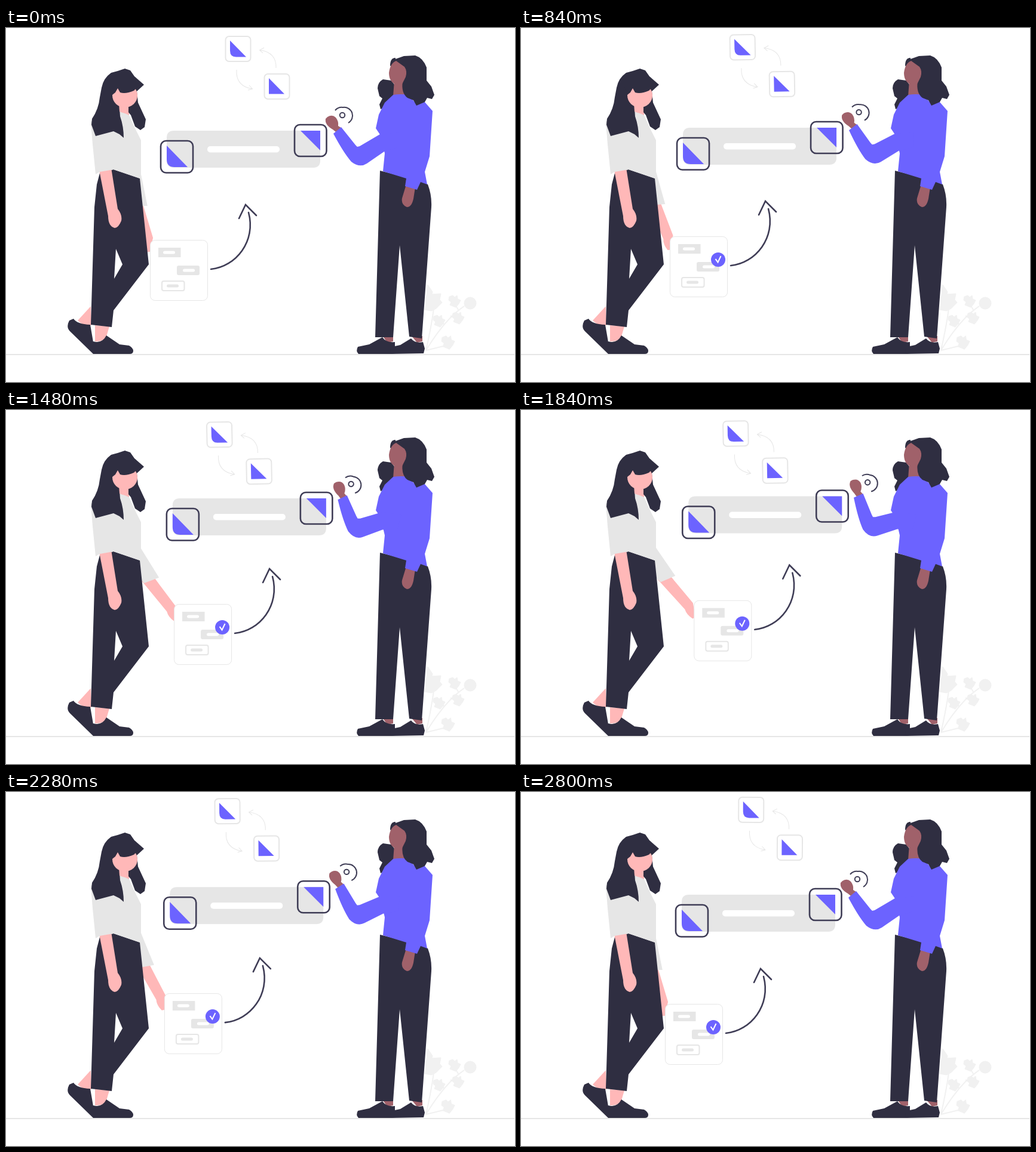
Recreate the animation shown at these times as an HTML page. Size 852x593 px, loop 2840 ms.

```html
<!DOCTYPE html>
<html lang="en">
<head>
<meta charset="utf-8">
<title>Design hand-over</title>
<style>
  html, body { margin: 0; width: 100%; height: 100%; overflow: hidden; background: #fff; }
  svg { display: block; width: 852px; height: 593px; }
  .dark { fill: #2f2e41; }
  .grey { fill: #e6e6e6; }
  .white { fill: #fff; }
  .violet { fill: #6c63ff; }
  .pale { fill: #ffb8b8; }
  .brown { fill: #a0616a; }
  .plant { fill: #f1f1f1; stroke: #f1f1f1; }
  .line { fill: none; stroke: #3f3d56; stroke-width: 2.6; }
  .thin { fill: none; stroke: #e6e6e6; }
</style>
</head>
<body>
<svg viewBox="0 0 852 593">
  <defs>
    <path id="leaf" d="M-9-8-3-10 0-7 4-10 5-4 10-2 7 4 2 10-3 8-8 6-6 1-10-2z"/>
  </defs>

  <g class="plant">
    <path d="M703 540Q735 487 767 466M703 540Q712 500 716 470M703 540L736 532M733 496L727 490M744 482L753 488M757 472L751 462" fill="none" stroke-width="2"/>
    <path d="M706 430L714 442 713 446 728 445 726 455 730 460 720 470 712 474 701 472z"/>
    <circle cx="777" cy="461" r="10"/>
    <use href="#leaf" x="751" y="458"/>
    <use href="#leaf" x="757" y="486"/>
    <use href="#leaf" x="725" y="491"/>
    <use href="#leaf" transform="translate(740 527) scale(1.1)"/>
  </g>
  <path d="M0 547H851" class="thin" stroke-width="2"/>

  <!-- woman on the left -->
  <g id="leftArm">
    <path class="pale" d="M226 286L248 281 283 328 286 352 281 354Q271 347 269 338L230 290z"/>
    <path class="grey" d="M192 200L226 232 256 281 231 290 196 255z"/>
  </g>
  <path class="pale" d="M142 466L143 498H130L120 490zM149 498L173 500 168 517Q163 526 149 525z"/>
  <g class="dark">
    <path d="M157 243L180 237 224 252 229 300 239 396 180 473 177 501 142 497 148 300 152 262zM184 370L181 420 195 396z" fill-rule="evenodd"/>
    <path d="M113 487Q119 496 141 497L146 526 155 545 146 546 107 508Q100 501 106 490z"/>
    <path d="M146 525Q161 529 168 515L190 530 206 532Q213 536 213 541 213 546 207 546H146z"/>
  </g>
  <path class="pale" d="M156 238L176 234 187 303Q195 313 193 323 188 335 182 335 171 332 171 315z"/>
  <path class="pale" d="M188 125H206V147H188z"/>
  <path class="grey" d="M150 150L142 157 145 195 150 245 157 241 180 237 224 252 226 251V188L216 168 206 146 190 139z"/>
  <g class="dark">
    <path d="M160 100Q163 84 176 75L187 72 199 68 208 71 215 81 231 95 219 106 221 125 234 153 232 166 225 171 216 165 209 146 204 140 190 134 191 148Q197 165 197 184L190 178 180 173 150 181 143 162 144 152Q155 136 157 116z"/>
  </g>
  <path class="pale" d="M189 126H205V143Q198 144 190 140z"/>
  <ellipse class="pale" cx="199" cy="113" rx="21" ry="20"/>
  <path class="dark" d="M172 96L190 82H216L225 99 219 100 214 105Q200 111 191 108L187 101 183 108 178 112z"/>

  <!-- woman on the right -->
  <path class="brown" d="M630 515H648V525L638 527zM679 516H697V525L688 527zM670 262L685 267 682 286Q679 300 671 300 661 296 663 285z"/>
  <g class="dark">
    <path d="M626 239L670 250 695 257 706 262Q713 280 712 300L696 520 675 517 659 364 648 518H618z"/>
    <path d="M630 518Q637 528 651 526V545L645 546H590Q585 541 589 534L608 530z"/>
    <path d="M678 520Q685 529 698 526L701 537 699 545 645 546Q641 541 646 534L660 531z"/>
    <path d="M645 88L631 86Q622 91 622 101L625 114 630 118 625 128 627 136 642 130 660 108z"/>
  </g>
  <path class="brown" d="M670 262L685 267 682 286Q679 300 671 300 661 296 663 285zM650 88H670V114H648z"/>
  <path class="violet" d="M648 112Q661 110 673 112L686 126 700 123 714 139 709 215 701 241 705 262 694 258 688 271 668 265 670 252 631 240 634 210 627 180 619 168 624 145 634 125z"/>
  <path class="dark" d="M643 63Q643 50 652 50V52L666 47 685 46Q698 50 704 66V88L712 98 717 112 713 119 705 117 701 124 687 130 682 121 672 117Q661 109 664 88z"/>
  <path class="brown" d="M653 55L667 65Q672 72 669 82L663 94Q661 97 656 96 641 92 641 75 643 59 653 55z"/>
  <g id="rightArm">
    <path class="brown" d="M538 149Q546 144 552 150 557 156 556 164L562 168 552 174 547 170Q533 162 535 152z"/>
    <path class="violet" d="M561 166L585 196 588 199 592 198 626 178 657 175V200L633 207 604 227Q592 235 578 224 565 209 548 177z"/>
    <g class="line" style="stroke-width:2">
      <circle cx="563" cy="146" r="4.2"/>
      <path d="M551 138Q556 132 564 133A14 14 0 0 1 573 159"/>
    </g>
  </g>

  <!-- wide bar with two handles -->
  <g id="bar">
    <path class="grey" d="M281 172H526V222Q526 234 514 234H281Q269 234 269 222V184Q269 172 281 172z"/>
    <rect class="white" x="337" y="198" width="121" height="10.5" rx="5"/>
    <path class="violet" d="M269 197L304 233H282Q269 233 269 220zM493 172H526V205z"/>
    <g class="line">
      <rect x="259" y="189" width="54" height="53.5" rx="9"/>
      <rect x="483" y="162" width="53.5" height="53" rx="9"/>
    </g>
  </g>

  <!-- card, curved arrow and tick -->
  <g id="card">
    <rect x="241.5" y="355.5" width="96" height="101" rx="8" fill="#fff" stroke="#e6e6e6"/>
    <g class="grey">
      <rect x="255" y="368" width="37.5" height="16"/>
      <rect x="286" y="398" width="38" height="16" rx="3"/>
      <rect x="269" y="429.500" width="20" height="5" rx="2.500"/>
    </g>
    <rect class="thin" stroke-width="2" x="261" y="424" width="37.500" height="16" rx="3"/>
    <rect class="white" x="263" y="373.500" width="20" height="5" rx="2.500"/>
    <rect class="white" x="296" y="403.500" width="20" height="5" rx="2.500"/>
    <path class="line" stroke-linecap="round" d="M343 404C385 400 419 357 406 309M390 319L401 296 419 314"/>
    <g id="badge">
      <circle class="violet" r="12"/>
      <path d="M-4.500-1L-.5 4.500 4.500-6" fill="none" stroke="#fff" stroke-width="2"/>
    </g>
  </g>

  <!-- pair of small icons -->
  <g id="icons">
    <g class="thin" stroke-width="2">
      <rect x="367.500" y="14" width="42" height="42" rx="6"/>
      <rect x="432.500" y="77" width="42" height="42" rx="6"/>
    </g>
    <path class="violet" d="M375 21L402 48.500H385Q375 48.500 375 38zM440 84L466 110.500H440z"/>
    <path class="thin" d="M386 70Q384 97 412 102M407 96L412.500 102 405 104M452 67Q453 41 425 37M432 33L424.500 37 430 42"/>
  </g>
</svg>

<script>
  const LOOP = 2840, SWAY = 3140;
  const place = (id, transform) => document.getElementById(id).setAttribute('transform', transform);

  // Steady rise from start, steady fall back to zero at end.
  const trip = (t, start, end, rise, fall) =>
    Math.max(0, Math.min((t - start) * rise, (end - t) * fall));

  function pop(t) {
    if (t < 320) return 1.25 * t / 320;
    return Math.max(1, 1.25 - 0.25 * (t - 320) / 220);
  }

  function draw(now) {
    const t = now % LOOP;
    const lift = trip(t, 672, 2665, 0.0297, 0.0333);
    const slide = trip(t, 680, 2710, 0.05, 0.0556);
    const angle = 2 * Math.PI * t / SWAY;

    place('bar', `translate(${0.41 * lift} ${-lift})`);
    place('card', `translate(${slide} ${-0.75 * slide})`);
    place('badge', `translate(322 394) scale(${pop(t)})`);
    place('leftArm', `rotate(${20 - 0.84 * lift} 198 235)`);
    place('rightArm', `rotate(${0.6 * lift} 657 193)`);

    const x = -15.4 * (1 - Math.cos(angle));
    const y = -5.8 * Math.sin(1.5 * angle);
    const tilt = -1.2 * Math.sin(Math.PI * t / 2600);
    place('icons', `translate(${x} ${y}) rotate(${tilt} 421 66)`);
  }

  const begin = performance.now();
  function tick() {
    draw(performance.now() - begin);
    requestAnimationFrame(tick);
  }
  tick();
</script>
</body>
</html>
```
